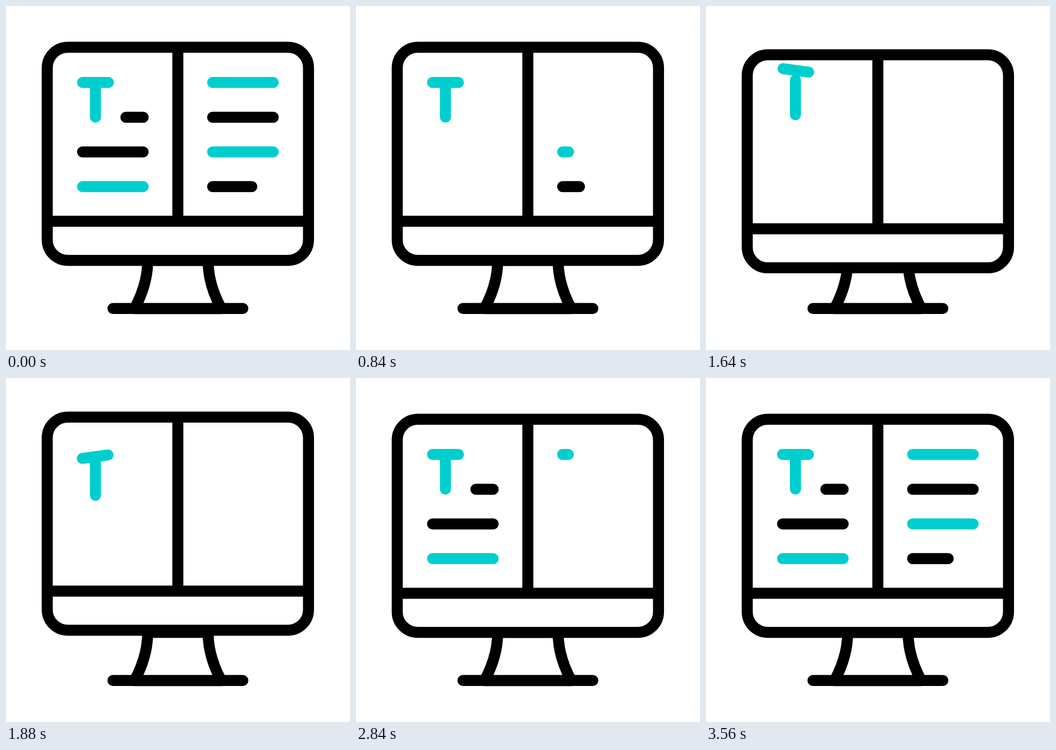
These frames come from a looping animation (640 px wide and 640 px high, 3600 ms). An HTML page:

```html
<!DOCTYPE html>
<html lang="en">
<head>
<meta charset="utf-8">
<title>Page layout on a monitor</title>
<style>
  html, body { margin: 0; width: 100%; height: 100%; overflow: hidden; background: #fff; }
  svg { display: block; width: 100vw; height: 100vh; }
  svg * { stroke-width: 20.5; stroke-linecap: round; stroke-linejoin: round; }
  .ink { stroke: #000; }
  .teal { stroke: #00cece; }
</style>
</head>
<body>
<svg viewBox="0 0 640 640" fill="none">
  <path class="ink" d="M239 563Q263.6 518 263.6 473.3H376Q376 518 400.6 563ZM199 562.8H440.6"/>
  <g id="screen">
    <rect class="ink" x="76.7" y="76.8" width="486.1" height="396.4" rx="38.3" fill="#fff"/>
    <path class="ink" d="M319.7 80V400.5M80 400.5H560"/>
    <g id="lines"></g>
  </g>
  <path id="stem" class="teal" d="M166.4 142.3V206.7"/>
  <path id="bar" class="teal" d="M142.4 142.3H190.6"/>
</svg>
<script>
  const LOOP = 3600;
  const byId = id => document.getElementById(id);
  const clamp = x => Math.min(1, Math.max(0, x));
  const smooth = x => (1 - Math.cos(Math.PI * clamp(x))) / 2;
  const easeOut = x => 1 - (1 - clamp(x)) ** 2.4;

  // Two columns of four rows; the letter T fills the first slot
  function makeLine(slot) {
    const right = slot >= 4;
    const row = slot % 4;
    const x = right ? 384.4 : 142.4;
    const path = document.createElementNS('http://www.w3.org/2000/svg', 'path');
    path.setAttribute('class', row === (right ? 2 : 3) || slot === 4 ? 'teal' : 'ink');
    byId('lines').append(path);
    return {
      path,
      y: 142.3 + 64.6 * row,
      start: slot === 1 ? x + 80.6 : x,
      end: slot === 7 ? x + 76.8 : x + 112.8,
      write: right ? 2760 + 283 * Math.sqrt(row) : 1738 + 236 * row,
      writeFor: right ? 410 : 300,
      erase: LOOP + (right ? 382 + 86 * row : 150 * row - 148)
    };
  }
  const lines = Array.from({ length: 7 }, (_, i) => makeLine(i + 1));

  function drawLine({ path, y, start, end, write, writeFor, erase }, t) {
    const part = smooth((t - write) / writeFor) - smooth((t - erase) / 360);
    path.setAttribute('d', part > 0.001 ? `M${start} ${y}H${start + (end - start) * part}` : '');
  }

  // Swing out to peak, back past rest to low, then settle
  function swing(t, peak, low, lowAt) {
    if (t < 1600) return peak * easeOut((t - 1240) / 360);
    if (t < lowAt) return peak + (low - peak) * smooth((t - 1600) / (lowAt - 1600));
    return low * (1 - smooth((t - lowAt) / (2360 - lowAt)));
  }

  const move = (id, y, turn = 0) =>
    byId(id).setAttribute('transform', `translate(0 ${y}) rotate(${turn} 166.5 147)`);

  function draw() {
    const now = performance.now() % LOOP;
    const t = now < 1200 ? now + LOOP : now;

    move('screen', swing(t, 14.7, -4.7, 1920));
    move('stem', swing(t, -5.1, 15.7, 2000));
    move('bar', swing(t, -23.4, 11, 2000), swing(t, 8.2, -11.6, 2000));
    lines.forEach(line => drawLine(line, t));

    requestAnimationFrame(draw);
  }
  draw();
</script>
</body>
</html>
```
